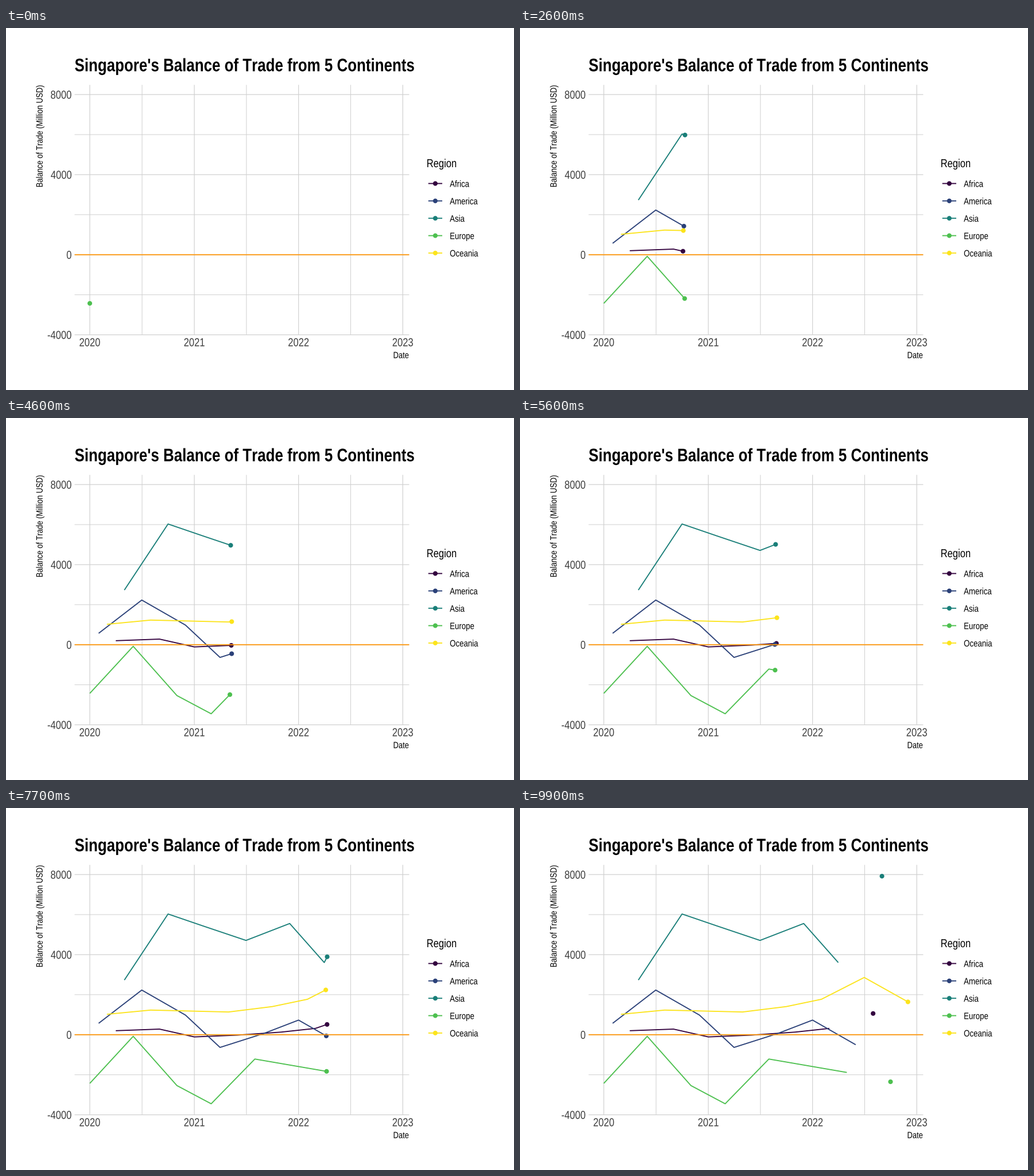
A matplotlib script for the animation above (10 s loop, 885 px wide and 632 px high).

```python
import numpy as np
import matplotlib.pyplot as plt
from matplotlib.animation import FuncAnimation
from matplotlib.patches import Circle, PathPatch
from matplotlib.textpath import TextPath
from matplotlib.transforms import Affine2D

W, H = 885, 632
FRAMES, INTERVAL = 100, 100
PX = 0.72        # points per pixel at 100 dpi
PT = 126.43 / 72  # pixels per point of type
NARROW = 0.82    # one condensing factor for the whole typeface
LEFT, RIGHT, TOP, BOTTOM = 119.5, 702.4, 99.3, 536.0
INK, SOFT, GRID, ORANGE = "#000000", "#3f3f3f", "#d0d0d0", "#fd9a13"
THICK, RADIUS = 1.87, 4.05

REGIONS = {
    "Africa": "#33023f",
    "America": "#2a4078",
    "Asia": "#1a7f79",
    "Europe": "#4dc04f",
    "Oceania": "#fce41c",
}

# One region reports each month, in turn; balances in million USD.
CODES = dict(zip("FASEO", REGIONS))
ORDER = "EAOFS" * 2 + "EAFS" + "EAOFS" * 2 + "AOFSE" * 2 + "AO"
BALANCE = [-2430, 570, 1020, 200, 2730, -80, 2230, 1230, 280, 6030, -2540, 980,
           -110, 5430, -3450, -635, 1135, -20, 4710, -1215, 60, 1405, 130, 5555,
           730, 1770, 315, 3605, -1885, -500, 2860, 1060, 7920, -2350, -1165,
           1640]

plt.rcParams["text.kerning_factor"] = 20  # plain advances, no kerning


def day(months):
    start = np.datetime64("2020-01", "M")
    dates = (start + np.asarray(months)).astype("datetime64[D]")
    return (dates - start.astype("datetime64[D]")).astype(int)


def to_x(days):
    return 146 + 0.4975 * np.asarray(days)


def to_y(value):
    return 395.8 - 0.03495 * np.asarray(value)


fig = plt.figure(figsize=(W / 100, H / 100), dpi=100, facecolor="white")
ax = fig.add_axes([0, 0, 1, 1])
ax.set_xlim(0, W)
ax.set_ylim(H, 0)
ax.axis("off")


def stroke(x, y, color, width, z):
    line, = ax.plot(x, y, color=color, lw=width * PX, zorder=z, snap=False,
                    solid_capstyle="butt", solid_joinstyle="round")
    return line


def marker(x, y, color):
    return ax.add_patch(Circle((x, y), RADIUS, fc=color, lw=0, zorder=4,
                               snap=False))


def label(x, y, text, points, color=INK, anchor=0.0, weight="normal", angle=0):
    font = {"family": "Liberation Sans", "weight": weight}
    path = TextPath((0, 0), text, size=points * PT, prop=font)
    box = path.get_extents()
    advance = box.x0 + box.x1  # side bearings taken as equal
    place = (Affine2D().translate(-anchor * advance, 0).scale(NARROW, -1)
             .rotate_deg(angle).translate(x, y))
    ax.add_patch(PathPatch(place.transform_path(path), fc=color, lw=0,
                           zorder=6, snap=False))


def draw_grid():
    for value in range(-4000, 8001, 2000):
        major = value % 4000 == 0
        y = to_y(value)
        stroke([LEFT, RIGHT], [y, y], GRID, 1.2 if major else 1.0, 1)
        if major:
            label(114.4, y + 7.2, str(value), 11.5, SOFT, 1)
    years = to_x(day([0, 12, 24, 36]))
    for x in (years[:-1] + years[1:]) / 2:
        stroke([x, x], [TOP, BOTTOM], GRID, 1.0, 1)
    for i, x in enumerate(years):
        stroke([x, x], [TOP, BOTTOM], GRID, 1.2, 1)
        label(x, 555.6, str(2020 + i), 11.5, SOFT, 0.5)
    stroke([LEFT, RIGHT], [to_y(0)] * 2, ORANGE, THICK, 5)


def draw_legend(x=732.7, key=30.34):
    label(x, 243, "Region", 11.5)
    for i, (name, color) in enumerate(REGIONS.items()):
        y = 271.5 + key * i
        stroke([x + 0.1 * key, x + 0.9 * key], [y, y], color, THICK, 3)
        marker(x + key / 2, y, color)
        label(x + key + 10.1, y + 6, name, 9.2)


class Series:
    def __init__(self, code):
        months = [m for m, c in enumerate(ORDER) if c == code]
        days = day(months)
        self.x = to_x(days)
        self.y = to_y([BALANCE[m] for m in months])
        # each value lands on a whole step of the timeline
        scale = (FRAMES - 1) / day(len(ORDER) - 1)
        self.steps = np.rint(days * scale).astype(int)
        name = CODES[code]
        self.dot_stays = name != "America"
        self.line = stroke([], [], REGIONS[name], THICK, 3)
        self.dot = marker(0, 0, REGIONS[name])

    def update(self, i):
        first, last = self.steps[0], self.steps[-1]
        x = np.interp(i, self.steps, self.x)
        y = np.interp(i, self.steps, self.y)
        done = last <= i and last < FRAMES - 1
        if done:
            # the closing segment goes as soon as its end is reached
            self.line.set_data(self.x[:-1], self.y[:-1])
        else:
            past = self.steps <= i
            self.line.set_data(np.append(self.x[past], x),
                               np.append(self.y[past], y))
        self.dot.center = x, y
        self.dot.set_visible(i >= first and (self.dot_stays or not done))


draw_grid()
draw_legend()
label(LEFT, 75.5, "Singapore's Balance of Trade from 5 Continents", 18,
      weight="bold")
label(63.7, TOP, "Balance of Trade (Million USD)", 9, anchor=1, angle=-90)
label(RIGHT, 576.4, "Date", 9, anchor=1)
series = [Series(code) for code in CODES]


def update(i):
    for s in series:
        s.update(i)
    return [artist for s in series for artist in (s.line, s.dot)]


anim = FuncAnimation(fig, update, frames=FRAMES, interval=INTERVAL,
                     repeat=True, repeat_delay=0, blit=False)
plt.show()
```
